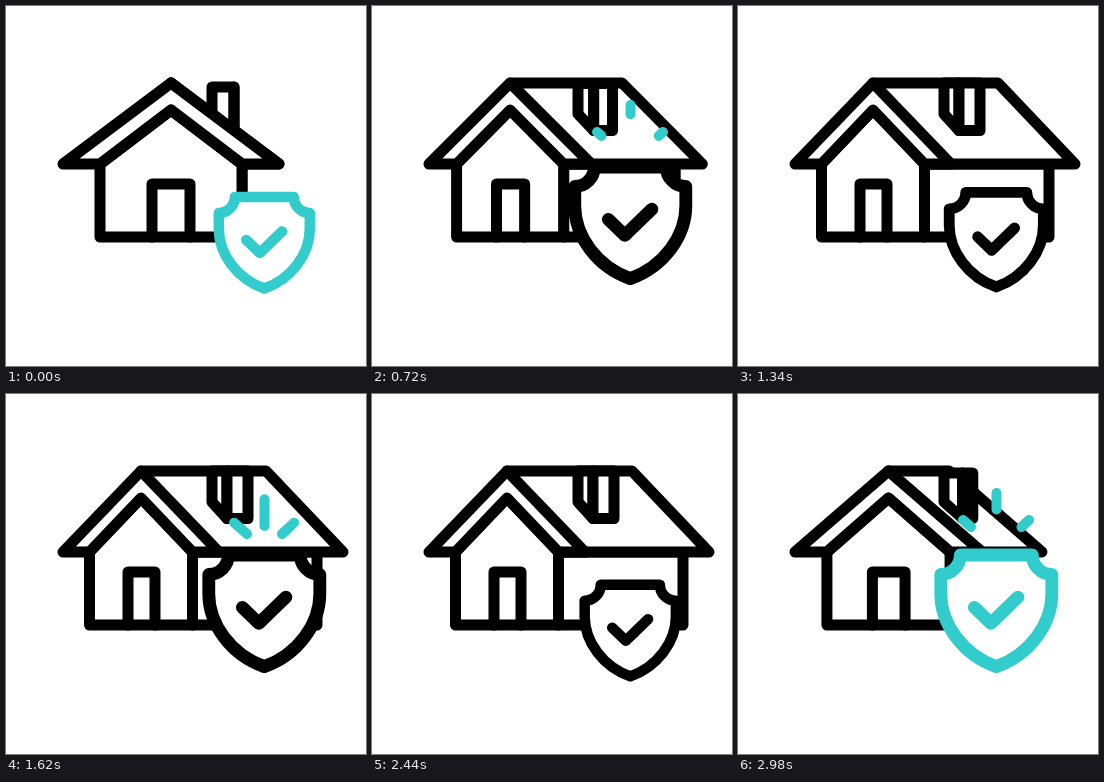
Animation of 360x360 px, one loop 3 s. Source, as an HTML page with a canvas:

```html
<!DOCTYPE html>
<html lang="en">
<head>
<meta charset="utf-8">
<title>Home protection</title>
<style>
html, body { margin: 0; width: 100%; height: 100%; overflow: hidden; background: #fff; }
canvas { display: block; width: 360px; height: 360px; }
</style>
</head>
<body>
<canvas id="stage" width="360" height="360"></canvas>
<script>
const ctx = document.getElementById('stage').getContext('2d');
const LOOP = 3000, STEP = 20, BEAT = 1160;
const BLACK = '#000', TEAL = '#33cccc';

const clamp = v => Math.max(0, Math.min(1, v));
const mix = (a, b, k) => a + (b - a) * k;
const span = (t, a, b) => clamp((t - a) / (b - a));
const ease = (t, a, b) => { const u = span(t, a, b); return u * u * (3 - 2 * u); };

function path(points, closed, filled) {
  ctx.beginPath();
  points.forEach(([x, y]) => ctx.lineTo(x, y));
  if (closed) ctx.closePath();
  if (filled) ctx.fill();
  ctx.stroke();
}

// k = 0: front view, k = 1: the side is fully pulled out
function house(k) {
  const apex = mix(165, 135, k);
  const half = mix(71, 51.5, k);
  const left = apex - half, right = apex + half;
  const eave = mix(108, 78, k);
  const ridge = mix(165, 260, k), tip = mix(273, 337, k);
  const side = mix(236, 311, k);
  const top = mix(81, 77, k);
  const c1 = mix(228, 221, k), c2 = mix(228, 242, k);
  const d1 = mix(146, 122, k), d2 = mix(184, 149, k);

  ctx.lineWidth = 11;
  ctx.strokeStyle = BLACK;
  ctx.fillStyle = '#fff';

  path([[right, 158], [side, 158], [side, 231], [right, 231]], true, true);
  path([[apex, 77], [ridge, 77], [tip, 158], [right, 158]], true, true);
  path([[206, top], [c1, top], [c1, 124.5], [206, 108]], true, true);
  path([[c1, top], [c2, top], [c2, 124.5], [c1, 124.5]], true, true);
  path([[left, 158], [apex, 104], [right, 158], [right, 231], [left, 231]], true, true);
  path([[apex, 77], [apex + eave, 158], [right, 158], [apex, 104],
        [left, 158], [57, 158]], true, true);
  path([[d1, 231], [d1, 178], [d2, 178], [d2, 231]]);
}

function sparks(t) {
  const u = span(t, 280, 600);
  const head = 1 - (1 - u) * (1 - u);
  const tail = ease(t, 460, 860);
  if (head <= 0 || tail >= 1) return;
  ctx.lineWidth = 10;
  ctx.strokeStyle = TEAL;
  const rays = [[241, 140, 225, 126], [258.5, 132, 258.5, 99], [276, 140, 291, 126]];
  for (const [x, y, ex, ey] of rays) {
    path([tail, head].map(k => [mix(x, ex, k), mix(y, ey, k)]));
  }
}

function shield(grow, color) {
  const s = 1 + 0.22 * grow;
  ctx.save();
  ctx.translate(258.3, 191 - 30 * grow);
  ctx.scale(s, s);
  ctx.lineWidth = 10.5;
  ctx.strokeStyle = color;
  ctx.fillStyle = '#fff';
  ctx.beginPath();
  ctx.moveTo(-29.5, 0);
  ctx.lineTo(29.5, 0);
  ctx.arc(45.5, 0, 16, Math.PI, Math.PI / 2, true);
  ctx.lineTo(45.5, 32);
  ctx.bezierCurveTo(45.5, 57, 27, 82, 0, 91.5);
  ctx.bezierCurveTo(-27, 82, -45.5, 57, -45.5, 32);
  ctx.lineTo(-45.5, 16);
  ctx.arc(-45.5, 0, 16, Math.PI / 2, 0, true);
  ctx.closePath();
  ctx.fill();
  ctx.stroke();
  path([[-18, 43], [-4.5, 56], [17.7, 34.5]]);
  ctx.restore();
}

function draw(t) {
  const beat = t % BEAT;
  const open = ease(t, 0, 900) - ease(t, 2520, 3420);
  const grow = ease(beat, 100, 420) - ease(beat, 720, 1040);
  ctx.fillStyle = '#fff';
  ctx.fillRect(0, 0, 360, 360);
  ctx.lineCap = ctx.lineJoin = 'round';
  house(open);
  sparks(beat);
  shield(grow, t < 220 || t >= 2860 ? TEAL : BLACK);
}

const start = performance.now();
function tick() {
  const t = (performance.now() - start) % LOOP;
  draw(Math.floor(t / STEP) * STEP);
  requestAnimationFrame(tick);
}
draw(0);
requestAnimationFrame(tick);
</script>
</body>
</html>
```
